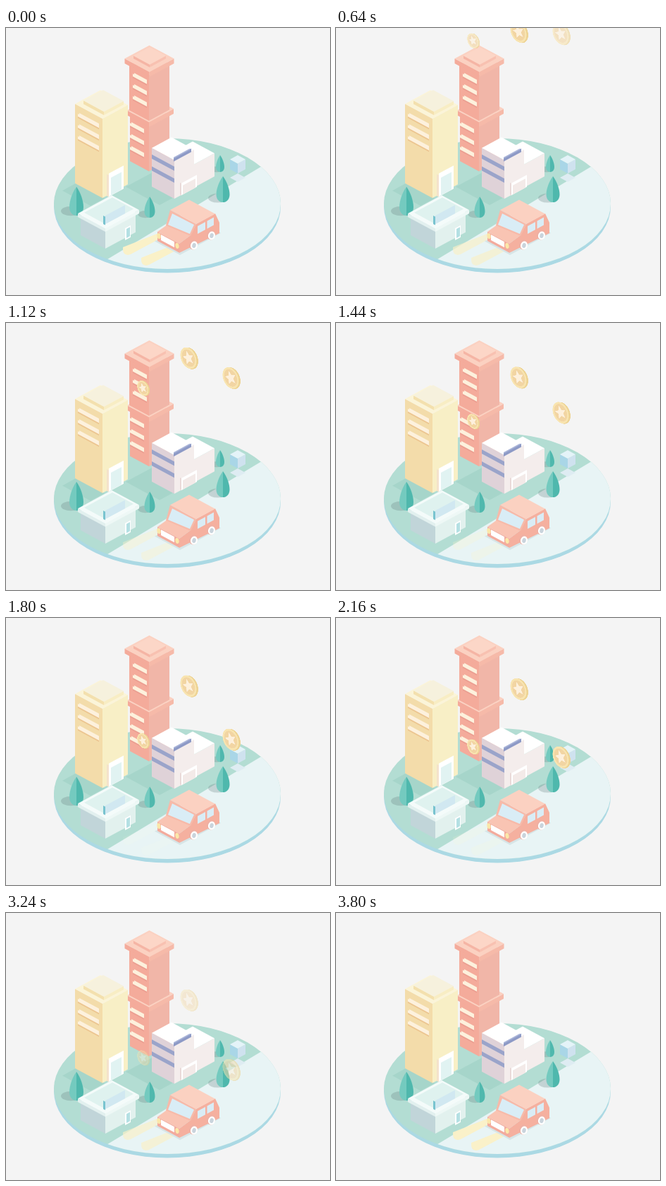
An HTML page with a canvas that plays this animation: 460 px wide and 380 px high, repeating every 3.84 s.

```html
<!DOCTYPE html>
<html lang="en">
<head>
<meta charset="utf-8">
<title>Isometric city with falling coins</title>
<style>
html, body { margin: 0; width: 100%; height: 100%; overflow: hidden; background: #f4f4f4; }
canvas { display: block; width: 460px; height: 380px; }
</style>
</head>
<body>
<canvas id="stage" width="460" height="380"></canvas>
<script>
const LOOP = 3840;
const SLOPE = 0.54; // rise of the isometric axes
const ctx = document.getElementById('stage').getContext('2d');

function poly(color, ...xy) {
  ctx.fillStyle = color;
  ctx.beginPath();
  for (let i = 0; i < xy.length; i += 2) ctx.lineTo(xy[i], xy[i + 1]);
  ctx.fill();
}

function oval(color, x, y, rx, ry, tilt = 0, c = ctx) {
  c.fillStyle = color;
  c.beginPath();
  c.ellipse(x, y, rx, ry, tilt, 0, Math.PI * 2);
  c.fill();
}

// Upright rectangle from its left top corner; dir 1 lies on a left wall, -1 on a right wall.
function panel(color, x, y, width, height, dir) {
  const drop = width * SLOPE * dir;
  poly(color, x, y, x + width, y + drop, x + width, y + drop + height, x, y + height);
}

// Lying rectangle from its front corner.
function tile(color, x, y, left, right) {
  poly(color, x, y, x - left, y - left * SLOPE,
    x + right - left, y - (left + right) * SLOPE, x + right, y - right * SLOPE);
}

// Block from the front corner of its lid.
function box(x, y, left, right, height, [lidColor, leftColor, rightColor]) {
  panel(leftColor, x - left, y - left * SLOPE, left, height, 1);
  panel(rightColor, x, y, right, height, -1);
  tile(lidColor, x, y, left, right);
}

function ledges(x, y, gap, width, shade) {
  for (let i = 0; i < 3; i++, y += gap) {
    panel(shade, x, y + 1, width, 5, 1);
    panel('#fdf1dd', x, y, width, 4, 1);
    panel('#fdf1dd', x + 2, y - 1, width - 2, 4, 1);
  }
}

function tree(x, tip, height, half) {
  oval('rgba(100,125,125,.28)', x - half * 0.8, tip + height * 0.84, half * 1.4, half * 0.68);
  for (const [side, color] of [[-half, '#74cabf'], [half, '#4fb8ad']]) {
    ctx.fillStyle = color;
    ctx.beginPath();
    ctx.moveTo(x, tip);
    ctx.bezierCurveTo(x + side * 0.6, tip + height * 0.2, x + side, tip + height * 0.5, x + side, tip + height * 0.7);
    ctx.bezierCurveTo(x + side, tip + height * 0.9, x + side * 0.5, tip + height, x, tip + height);
    ctx.fill();
  }
}

function ground() {
  oval('#abd9e4', 229, 254, 161, 94.5);
  ctx.save();
  ctx.beginPath();
  ctx.ellipse(229, 250, 161, 93, 0, 0, Math.PI * 2);
  ctx.clip();
  ctx.fillStyle = '#b3ddd3';
  ctx.fillRect(60, 150, 340, 200);
  poly('#e8f4f5', 126, 340, 361, 198, 400, 175, 400, 350);
  ctx.restore();
  tile('#a6d5ca', 120, 253, 40, 20);
  tile('#a6d5ca', 218, 252, 48, 40);
}

function redTower() {
  const wall = ['#fbd1c1', '#f4ab9b', '#f1b6a8'];
  const rim = ['#fbd1c1', '#f4ab9b', '#f6baa9'];
  box(203, 139, 27, 29, 65, wall);
  box(203, 134, 31, 35, 7, rim);
  box(203, 67, 28, 29, 65, wall);
  box(203.5, 62.5, 35, 35, 7, rim);
  box(204, 52, 23, 23, 4, ['#fcd6c7', '#f5b5a5', '#f8c1b1']);
  ledges(180, 65, 16, 20, '#eb9e91');
  ledges(176, 135, 17, 20, '#eb9e91');
}

function yellowTower() {
  box(137, 129, 39, 36, 113, ['#fbf4d8', '#f3dcaa', '#f8efc6']);
  box(139, 119, 29, 28, 5, ['#f6f1dd', '#f3e0ae', '#f8edc4']);
  ledges(102, 122, 16, 30, '#ecc590');
  panel('#f4e2cc', 143, 208, 4, 31, 1);
  panel('#ffffff', 146, 207, 21, 33, -1);
  panel('#e1f3f2', 149, 213, 15, 25, -1);
}

function whiteHouse() {
  const wall = ['#ffffff', '#dfd2d8', '#f4edec'];
  box(267, 194, 31, 29, 33, wall);
  box(239, 188, 32, 28, 55, wall);
  for (const y of [180, 197]) panel('#9aa4ca', 207, y, 32, 6, 1);
  panel('#8d9ac6', 238, 185, 25, 5, -1);
  panel('#a9b4d8', 238, 184, 23, 2, -1);
  panel('#e9d9d8', 247, 220, 3, 17, 1);
  panel('#ffffff', 249, 221, 22, 17, -1);
  panel('#f3eae8', 251, 224, 18, 13, -1);
}

function shop() {
  box(141, 286, 35, 43, 28, ['#ffffff', '#c1d5d9', '#e2f1ee']);
  box(141, 285, 39, 48, 5, ['#f4fbfa', '#e2f0ef', '#eef8f6']);
  tile('#dff2ef', 141, 279, 30, 40);
  panel('#d1e8f1', 141, 267, 28, 12, -1);
  panel('#78c3cf', 138, 267, 3, 12, 1);
  panel('#ffffff', 169, 285, 8, 17, -1);
  panel('#b4e0e3', 171, 286, 5, 13, -1);
}

function sign() {
  tile('#deecf2', 329, 219, 11, 11);
  box(329, 193, 11, 11, 14, ['#e4f3f8', '#a9d6e7', '#cfe2ef']);
}

function car() {
  const paint = '#f5b09f', glass = '#d9edf6';
  tile('#d6e5e7', 247, 323, 36, 58);
  poly(paint, 246, 307, 262, 295, 270, 279, 297, 264, 303, 277, 303, 292, 246, 320);
  panel('#f3ab9d', 215, 290, 31, 13, 1);
  poly('#f9c4b3', 215, 290, 229, 280, 262, 295, 246, 307);
  poly('#f7baa9', 233, 259, 270, 279, 262, 296, 227, 281);
  tile('#fbd1c1', 270, 279, 37, 27);
  poly(glass, 236, 264, 267, 280, 261, 293, 230, 280);
  panel(glass, 272, 282, 23, 11, -1);
  panel(paint, 283, 275, 2.5, 13, -1);
  panel('#ffffff', 220, 294, 19, 8, 1);
  for (const [x, y] of [[267, 309.5], [292, 295.5]]) {
    oval('#eeb0a4', x - 1, y - 1, 6, 7, 0.2);
    oval('#ffffff', x, y, 5, 6, 0.2);
    oval('#c9d4dc', x, y, 2.7, 3.6, 0.2);
  }
  for (const [x, y] of [[217, 296], [243, 310]]) oval('#fbe7aa', x, y, 2.6, 4, -0.2);
}

function beams(alpha) {
  ctx.save();
  ctx.globalAlpha = alpha;
  ctx.fillStyle = '#faf1c8';
  ctx.translate(166, 312);
  for (let i = 0; i < 2; i++) {
    ctx.fill(new Path2D('M48 -19L54 -13L11 10Q-1 14 0 0Z'));
    ctx.translate(26, 15);
  }
  ctx.restore();
}

// The coin is painted once so that it fades as a whole.
function paintCoin() {
  const layer = document.createElement('canvas');
  layer.width = layer.height = 160;
  const c = layer.getContext('2d'), tilt = -0.4;
  c.setTransform(4, 0, 0, 4, 80, 80);
  oval('#edd394', 1, 0.2, 11, 16.2, tilt, c);
  oval('#f8e4b0', -1, -0.2, 10.5, 16, tilt, c);
  oval('#f2d5a3', -1, -0.2, 8.3, 13, tilt, c);
  c.translate(-1, -0.2);
  c.rotate(tilt);
  c.scale(0.72, 1);
  c.fillStyle = '#fdf0dc';
  c.beginPath();
  for (let i = 0; i < 10; i++) {
    const r = i % 2 ? 4.8 : 10.5, a = i * Math.PI / 5 + 0.2;
    c.lineTo(r * Math.sin(a), -r * Math.cos(a));
  }
  c.fill();
  return layer;
}

const coinLayer = paintCoin();
const coins = [
  { x: 195, size: 28, rest: 182, height: 211, fall: 2040, shown: 950, fade: 2450 },
  { x: 260, size: 40, rest: 100, height: 123, fall: 2000, shown: 600, fade: 2450 },
  { x: 320, size: 40, rest: 199, height: 232, fall: 2300, shown: 1050, fade: 2750 }
];
const clamp = v => Math.max(0, Math.min(1, v));

// A sine-eased drop, then a slow drift while fading out.
function coin({ x, size, rest, height, fall, shown, fade }, t) {
  const above = height * (1 + Math.cos(Math.PI * clamp(t / fall))) / 2;
  const drift = 42 * clamp((t - 2000) / (LOOP - 2000)) ** 1.4;
  ctx.globalAlpha = Math.min(clamp(t / shown), clamp((LOOP - 40 - t) / (LOOP - 40 - fade)));
  ctx.drawImage(coinLayer, x - size / 2, rest - above + drift - size / 2, size, size);
  ctx.globalAlpha = 1;
}

function draw() {
  const t = performance.now() % LOOP;
  ctx.fillStyle = '#f4f4f4';
  ctx.fillRect(0, 0, 460, 380);
  ground();
  redTower();
  yellowTower();
  tree(304, 181, 24, 6);
  whiteHouse();
  sign();
  tree(308, 211, 37, 9.5);
  tree(100, 226, 41, 10);
  tree(204, 240, 30, 7.5);
  shop();
  beams(Math.abs(1 - 2 * t / LOOP));
  car();
  for (const c of coins) coin(c, t);
  requestAnimationFrame(draw);
}
draw();
</script>
</body>
</html>
```
